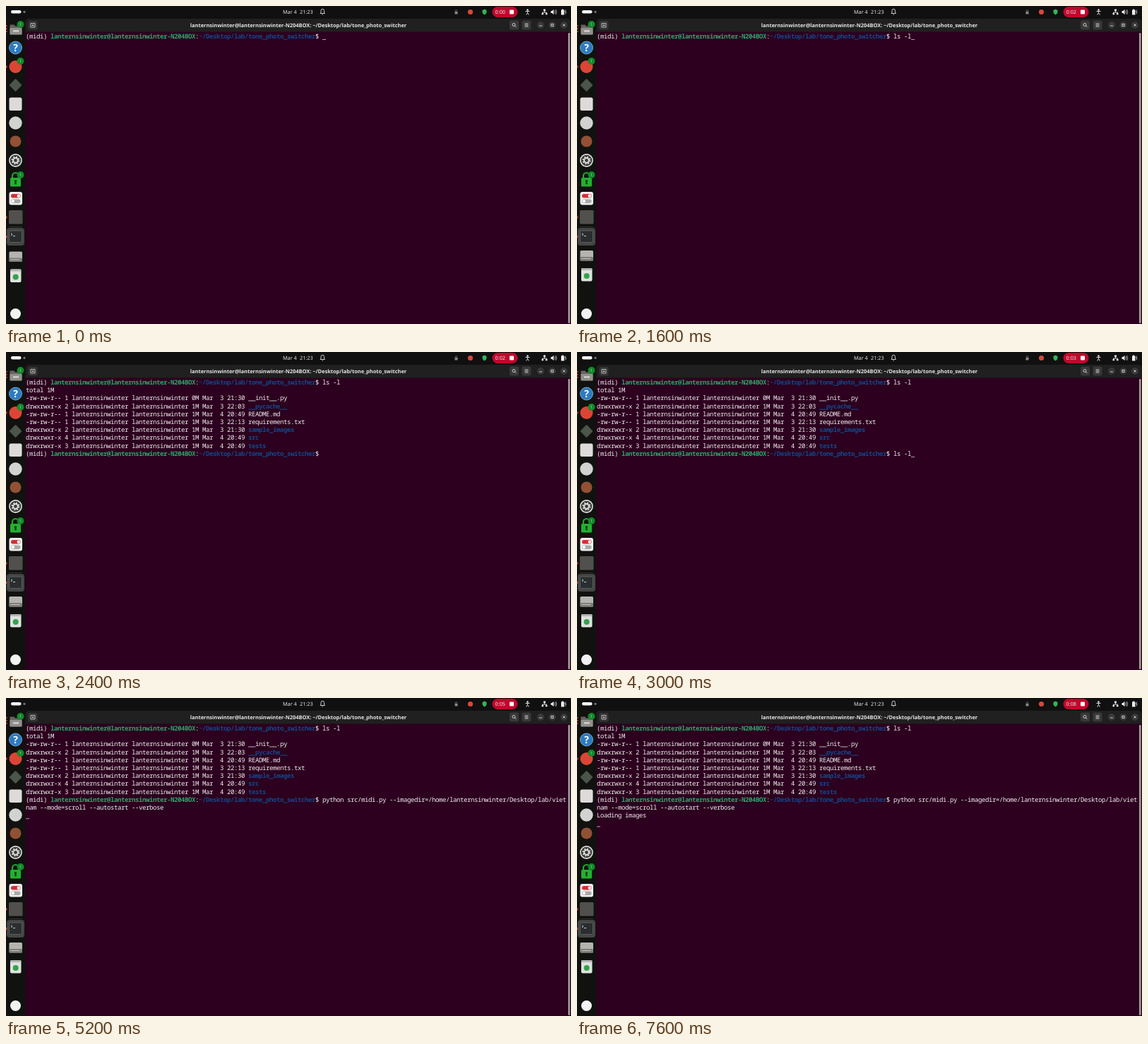
An HTML page for the animation above (8000 ms loop, 800 px wide and 450 px high).

```html
<!DOCTYPE html>
<html lang="en">
<head>
<meta charset="utf-8">
<title>Terminal session</title>
<style>
  html, body { margin: 0; width: 100%; height: 100%; overflow: hidden; background: #0d0d0c; }
  svg { display: block; width: 800px; height: 450px; }
  text { white-space: pre; font: 7.3px "Noto Sans", sans-serif; fill: #e4e4e4; text-rendering: geometricPrecision; }
  .mid { text-anchor: middle; }
  .title { font-size: 7.45px; font-weight: 700; }
  #screen text { font: 9px "Noto Sans Mono", "Liberation Mono", monospace; letter-spacing: -.4px; fill: #f2f0f2; }
  #screen .user { fill: #2aa86c; font-weight: 700; }
  #screen .dir { fill: #12488b; font-weight: 700; }
  .line { fill: none; stroke: #dcdcdc; stroke-width: 1; }
  .badge text { font-size: 5.5px; fill: #a9dcae; }
</style>
</head>
<body>
<svg viewBox="0 0 800 450">
  <defs>
    <g id="badge" class="badge">
      <circle r="5" fill="#138a2c"/>
      <text class="mid" y="2">1</text>
    </g>
  </defs>

  <!-- top bar -->
  <rect width="800" height="18" fill="#101010"/>
  <rect x="7" y="6" width="14.500" height="4.500" rx="2.200" fill="#f4f4f4"/>
  <circle cx="26" cy="8.300" r="1.600" fill="#777"/>
  <text x="392" y="11">Mar 4</text>
  <text x="416" y="11">21:23</text>
  <path class="line" d="M445 10.500h6.500l-1-1.500v-2.500a2.200 2.200 0 0 0-4.500 0v2.500zM447.500 12h1.500" style="stroke-width:.9"/>
  <path d="M635.500 8h4v3.500h-4z" fill="#888"/>
  <path class="line" d="M636.300 8v-1.200a1.200 1.200 0 0 1 2.400 0v1.200" style="stroke:#888;stroke-width:.7"/>
  <circle cx="657.500" cy="8.500" r="3.600" fill="#d8483a"/>
  <path d="M674.500 6l3-1.500 3 1.500v3q-.5 2.500-3 3.500-2.500-1-3-3.500z" fill="#38b257"/>
  <rect x="688.500" y="1" width="36" height="15" rx="7.500" fill="#c2062c"/>
  <text id="timer" x="692.500" y="11"></text>
  <rect x="713" y="5.500" width="6" height="6" rx=".8" fill="#fff"/>
  <circle cx="738.500" cy="5.500" r="1.200" fill="#eee"/>
  <path class="line" d="M735.500 7.500h6M738.500 7.500v2l-1.800 3M738.500 9.500l1.800 3"/>
  <path class="line" d="M762.500 6.500v2.500M759.500 11v-2h6v2"/>
  <path d="M761 4.500h3v2.500h-3zM758.500 10h2.500v2.200h-2.500zM764 10h2.500v2.200h-2.500z" fill="#eee"/>
  <path d="M771.500 7h1.700l2.300-2.300v7.600l-2.300-2.300h-1.700z" fill="#eee"/>
  <path class="line" d="M777 6.500q1.200 2 0 4M778.500 5q2.200 3.500 0 7" style="stroke-width:.8"/>
  <path d="M786 5.500h1.200v-1h2v1h1.200v7h-4.400z" fill="#eee"/>
  <path d="M792.500 5.500l-1 2.700h1.600l-1.100 3.200" class="line" style="stroke-width:.8"/>

  <!-- dock -->
  <rect y="18" width="28" height="432" fill="#11120f"/>
  <path d="M5.500 26.500h6l1.500 2h8.500q1 0 1 1v10q0 1-1 1h-15q-1 0-1-1z" fill="#65625f"/>
  <rect x="5.500" y="31" width="17" height="9.500" rx="1" fill="#92908d"/>
  <rect x="10" y="34.500" width="8" height="1.800" fill="#e4e1de"/>
  <use href="#badge" x="20.500" y="26"/>

  <circle cx="13.500" cy="59" r="9" fill="#2d7ac2" stroke="#8fbce2" stroke-width=".8"/>
  <text class="mid" x="13.500" y="64" style="font-size:14px;font-weight:600;fill:#fff">?</text>

  <circle cx="13.500" cy="86" r="9" fill="#dc4535"/>
  <use href="#badge" x="20.500" y="78"/>

  <rect x="7" y="105.500" width="13" height="13" rx="1.500" transform="rotate(45 13.500 112)" fill="#4b554a"/>
  <rect x="4.500" y="129.500" width="18" height="18.500" rx="2.500" fill="#dedada"/>
  <circle cx="13.500" cy="165.500" r="9.200" fill="#d2d2d0"/>
  <circle cx="13.500" cy="191.500" r="8" fill="#925034"/>

  <circle cx="13.500" cy="218.500" r="8.600" fill="#3c3c3a" stroke="#deDEDC" stroke-width="1.600"/>
  <circle cx="13.500" cy="218.500" r="5" fill="none" stroke="#dededc" stroke-width="1.800" stroke-dasharray="1.960"/>
  <circle cx="13.500" cy="218.500" r="3.400" fill="none" stroke="#dededc" stroke-width="2"/>

  <path d="M9 245v-4.500a4.500 4.500 0 0 1 9 0v4.500" fill="none" stroke="#25a630" stroke-width="2.200"/>
  <rect x="6" y="243" width="15" height="12.500" rx="1.500" fill="#23b02f"/>
  <path d="M13.500 246a1.800 1.800 0 0 1 1 3.200l.5 3h-3l.5-3a1.800 1.800 0 0 1 1-3.200z" fill="#0d3d12"/>
  <use href="#badge" x="20.500" y="239"/>

  <rect x="4.500" y="263" width="18.500" height="18.500" rx="3" fill="#efefef"/>
  <rect x="7" y="266" width="13.500" height="5.500" rx="2.700" fill="#d52f36"/>
  <circle cx="17.800" cy="268.700" r="2.200" fill="#fff"/>
  <rect x="7" y="273.500" width="13.500" height="5.500" rx="2.700" fill="#aaa"/>
  <circle cx="9.800" cy="276.200" r="2.200" fill="#fff"/>

  <rect x="4" y="289" width="19.500" height="19.500" rx="1.500" fill="#51504c"/>

  <path d="M4 312.500h19" stroke="#3b3b39" stroke-width=".8"/>
  <rect x="1" y="314" width="25" height="25" rx="4" fill="#454543"/>
  <rect x="4.500" y="318" width="18" height="16.500" rx="2" fill="#2b2e30" stroke="#65686a" stroke-width=".8"/>
  <path class="line" d="M7 321.500l2 1.700-2 1.700M10 325.500h3" style="stroke-width:.9"/>

  <g id="places">
    <rect x="4.500" y="346" width="18.500" height="14.500" rx="1.500" fill="#b4b3b0"/>
    <rect x="4.500" y="355" width="18.500" height="5.500" rx="1.500" fill="#7d7c78"/>
    <rect x="6.500" y="357" width="13" height="1" fill="#c4c3bf"/>
    <rect x="6" y="371" width="15.500" height="18.500" rx="2" fill="#dfe2de"/>
    <rect x="6" y="371" width="15.500" height="3" rx="1.200" fill="#b3b6b1"/>
    <circle cx="13.700" cy="382" r="4" fill="#33a24c"/>
  </g>
  <circle cx="13.500" cy="435.500" r="7.500" fill="#f2f2f2"/>
  <path d="M.8 27v2m0 2v2m0 2v2M.8 84.500v3M.8 297.500v3M.8 325v3" stroke="#d5402c" stroke-width="1.400"/>

  <!-- window -->
  <path d="M27.500 38v-15q0-5 5-5h762q5 0 5 5v15z" fill="#202020"/>
  <rect x="27.500" y="36.500" width="772" height="413.500" fill="#2c001e"/>
  <rect x="796" y="38" width="2.600" height="411" rx="1.300" fill="#a69ca3"/>
  <rect x="31.500" y="21" width="13" height="12.500" rx="2.500" fill="#353535"/>
  <path class="line" d="M35 24.500h6v5.500h-6zM38 25.800v3M36.500 27.300h3" style="stroke-width:.8"/>
  <text id="title" class="mid title" x="414" y="29.600"></text>
  <g fill="#383838">
    <rect x="713" y="20.500" width="13" height="13" rx="2.500"/>
    <rect x="730.500" y="20.500" width="13" height="13" rx="2.500"/>
    <circle cx="757" cy="27" r="5"/>
    <circle cx="773.500" cy="27" r="5"/>
    <circle cx="790" cy="27" r="5"/>
  </g>
  <g class="line" style="stroke-width:.9">
    <circle cx="719" cy="26.500" r="2"/>
    <path d="M720.500 28l1.800 1.800M734.500 25h5M734.500 27h5M734.500 29h5M755 28h4M788.500 25.500l3 3M791.500 25.500l-3 3"/>
    <rect x="772" y="25.500" width="3" height="3"/>
  </g>

  <g id="screen"></g>
  <rect id="cursor" width="5" height=".8" fill="#cfc6cc"/>
</svg>

<script>
const LOOP = 8000, COL = 5, ROW = 11.2, LEFT = 28, TOP = 46, COLUMNS = 153, BLINK = 600;
const user = 'lanternsinwinter', host = user + '-N204BOX';
const path = '~/Desktop/lab/tone_photo_switcher';
const command = `python src/midi.py --imagedir=/home/${user}/Desktop/lab/vietnam --mode=scroll --autostart --verbose`;
const $ = id => document.getElementById(id);

const span = (cls, s) => `<tspan class="${cls}">${s}</tspan>`;
const prompt = `(midi) ${span('user', user + '@' + host)}:${span('dir', path)}$ `;
const promptLength = 7 + user.length + 1 + host.length + 1 + path.length + 2;

const file = (mode, links, size, date, name) =>
  `${mode} ${links} ${user} ${user} ${size} Mar  ${date} ${mode[0] === 'd' ? span('dir', name) : name}`;
const listing = [
  'total 1M',
  file('-rw-rw-r--', 1, '0M', '3 21:30', '__init__.py'),
  file('drwxrwxr-x', 2, '1M', '3 22:03', '__pycache__'),
  file('-rw-rw-r--', 1, '1M', '4 20:49', 'README.md'),
  file('-rw-rw-r--', 1, '1M', '3 22:13', 'requirements.txt'),
  file('drwxrwxr-x', 2, '1M', '3 21:30', 'sample_images'),
  file('drwxrwxr-x', 4, '1M', '4 20:49', 'src'),
  file('drwxrwxr-x', 3, '1M', '4 20:49', 'tests')
];

// Times at which a key restarts the cursor blink
const keys = [-400, 800, 1000, 1200, 1400, 1600, 1800, 2800, 3800, 5200];

// Returns the visible lines and the cursor column
function session(t) {
  const typed = t < 800 ? 0 : Math.min(5, Math.floor((t - 600) / 200));
  const first = 'ls -l'.slice(0, typed);
  if (t < 1800) return [[prompt + first], promptLength + typed];

  const input = t < 2800 ? '' : t < 3800 ? 'ls -l' : command;
  const room = COLUMNS - promptLength;
  const lines = [prompt + first, ...listing, prompt + input.slice(0, room)];
  if (input.length <= room) return [lines, promptLength + input.length];

  const rest = input.slice(room);
  lines.push(rest);
  if (t < 5200) return [lines, rest.length];
  if (t >= 6400) lines.push('Loading images');
  return [[...lines, ''], 0];
}

let shown = '';
function draw(now) {
  const t = now % LOOP;
  const [lines, column] = session(t);
  const markup = lines.map((s, i) => `<text x="${LEFT}" y="${TOP + i * ROW}">${s}</text>`).join('');
  if (markup !== shown) $('screen').innerHTML = shown = markup;

  const lastKey = keys.filter(k => k <= t).pop();
  const lit = Math.floor((t - lastKey) / BLINK) % 2 === 0;
  $('cursor').setAttribute('x', LEFT + column * COL);
  $('cursor').setAttribute('y', TOP + 1.2 + (lines.length - 1) * ROW);
  $('cursor').setAttribute('visibility', lit ? 'visible' : 'hidden');
  $('timer').textContent = '0:0' + Math.floor((t + 400) / 1000);
  $('places').setAttribute('transform', `translate(0 ${t < 200 ? 1.5 : 0})`);
  requestAnimationFrame(draw);
}

$('title').textContent = `${user}@${host}: ${path}`;
draw(0);
</script>
</body>
</html>
```
